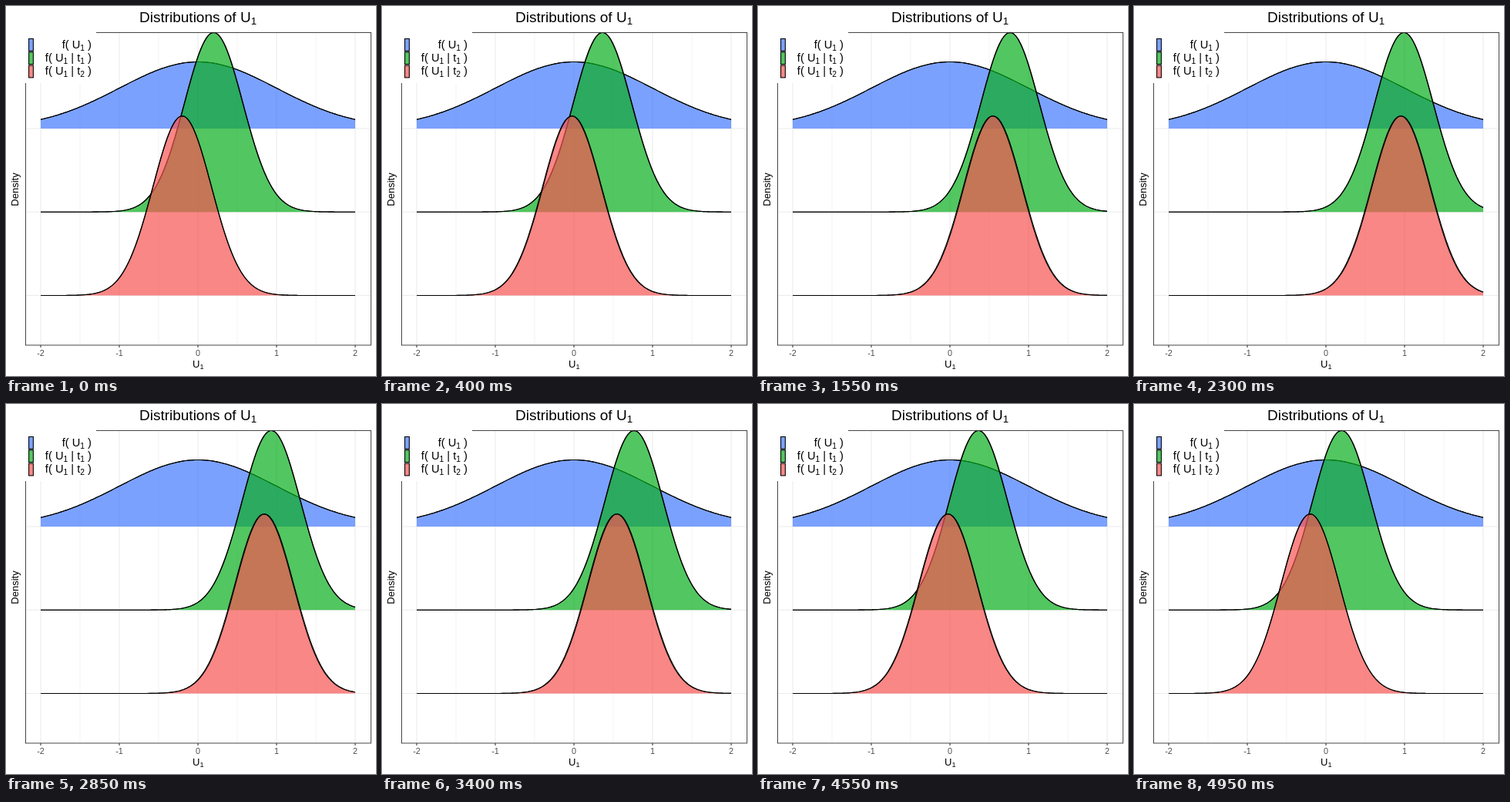
Write an HTML page that moves like this. It is 480 px wide and 480 px high and loops after 5000 ms.

```html
<!DOCTYPE html>
<html lang="en">
<head>
<meta charset="utf-8">
<title>Distributions of U1</title>
<style>
html, body { margin: 0; width: 100%; height: 100%; overflow: hidden; background: #fff; }
svg { display: block; width: 100vw; height: 100vh; }
text { font-family: "Liberation Sans", Arial, sans-serif; }
.line { fill: none; stroke: #000; stroke-width: 1.07; stroke-linejoin: round; }
</style>
</head>
<body>
<svg id="stage" viewBox="0 0 480 480"></svg>
<script>
const stage = document.getElementById("stage");
const FRAME = 50, HALF = 50;
const NARROW = 0.3715, TALL = 232.8;
const xPos = u => 249 + 102 * u;

function add(tag, attrs, text) {
  const el = document.createElementNS("http://www.w3.org/2000/svg", tag);
  for (const k in attrs) el.setAttribute(k, attrs[k]);
  if (text !== undefined) el.textContent = text;
  stage.appendChild(el);
  return el;
}

// Text where "_1" marks a subscript
function label(str, x, y, size, anchor) {
  const el = add("text", { x, y, "font-size": size, "text-anchor": anchor });
  const drop = size * 0.18;
  let shift = 0;
  for (const part of str.split(/(_\d)/)) {
    if (!part) continue;
    const sub = part[0] === "_";
    const span = document.createElementNS(el.namespaceURI, "tspan");
    span.textContent = sub ? part[1] : part;
    if (sub) span.setAttribute("font-size", size * 0.7);
    const want = sub ? drop : 0;
    span.setAttribute("dy", want - shift);
    shift = want;
    el.appendChild(span);
  }
}

function curve(mean, sd, height, base) {
  const pts = [];
  for (let k = 0; k <= 204; k++) {
    const u = -2 + k / 51, z = (u - mean) / sd;
    pts.push(xPos(u).toFixed(2) + " " + (base - height * Math.exp(-z * z / 2)).toFixed(2));
  }
  return "M" + pts.join("L");
}

function ridge(color, base, sd, height) {
  const area = add("path", { fill: color, "fill-opacity": 0.7 });
  const lines = [-1, 1].map(side => ({ side, el: add("path", { class: "line" }) }));
  return (mean, spread) => {
    area.setAttribute("d", curve(mean, sd, height, base) + `L${xPos(2)} ${base}L${xPos(-2)} ${base}Z`);
    for (const { side, el } of lines)
      el.setAttribute("d", curve(mean + side * spread / 102, sd, height, base));
  };
}

// Panel grid
for (let k = -4; k <= 4; k++) {
  const x = xPos(k / 2);
  add("path", { d: `M${x} 34.5V440`, stroke: "#ebebeb", "stroke-width": k % 2 ? 0.53 : 1.07 });
}
for (const y of [159, 267.2, 375.5])
  add("path", { d: `M25.5 ${y}H473.5`, stroke: "#ebebeb", "stroke-width": 1.07 });

const BLUE = "#4479ff", GREEN = "#09ae1d", RED = "#f55552";
const blue = ridge(BLUE, 159, 1, 86.5);
const green = ridge(GREEN, 267.2, NARROW, TALL);
const red = ridge(RED, 375.5, NARROW, TALL);
blue(0, 0);

// Border, axes and titles
add("rect", { x: 25.5, y: 34.5, width: 448, height: 405.5, fill: "none", stroke: "#333", "stroke-width": 0.9 });
for (let u = -2; u <= 2; u++) {
  add("path", { d: `M${xPos(u)} 440v3`, stroke: "#333", "stroke-width": 1.07 });
  add("text", { x: xPos(u), y: 454, "font-size": 10.8, "text-anchor": "middle", fill: "#4d4d4d" }, u);
}
label("Distributions of U_1", 249, 21, 19, "middle");
label("U_1", 249.3, 469, 13, "middle");
add("text", { transform: "translate(16 238) rotate(-90)", "font-size": 13, "text-anchor": "middle" }, "Density");

// Legend
add("rect", { x: 22, y: 32, width: 95, height: 68, fill: "#fff" });
[[BLUE, "f( U_1 )"], [GREEN, "f( U_1 | t_1 )"], [RED, "f( U_1 | t_2 )"]].forEach(([color, str], k) => {
  add("rect", { x: 29.6, y: 42.5 + 17.3 * k, width: 5.8, height: 15.8,
    fill: color, "fill-opacity": 0.7, stroke: "#000", "stroke-width": 1.07 });
  label(str, 111, 55 + 17.2 * k, 14.7, "end");
});

function draw(ms) {
  const n = Math.floor(ms / FRAME) % (2 * HALF);
  const i = n < HALF ? n : 2 * HALF - 1 - n;
  const sum = 0.0423 * i;
  const gap = 0.4 * Math.cos(i / 49 * Math.PI / 2);
  const bump = Math.exp(-(((i - 17) / 6) ** 2));
  green((sum + gap) / 2, 0.22 + 0.28 * bump);
  red((sum - gap) / 2, 0.2 + 0.25 * Math.min(1, i / 12) + 0.2 * bump);
}

let start;
function tick(now) {
  if (start === undefined) start = now;
  draw(now - start);
  requestAnimationFrame(tick);
}
draw(0);
requestAnimationFrame(tick);
</script>
</body>
</html>
```
